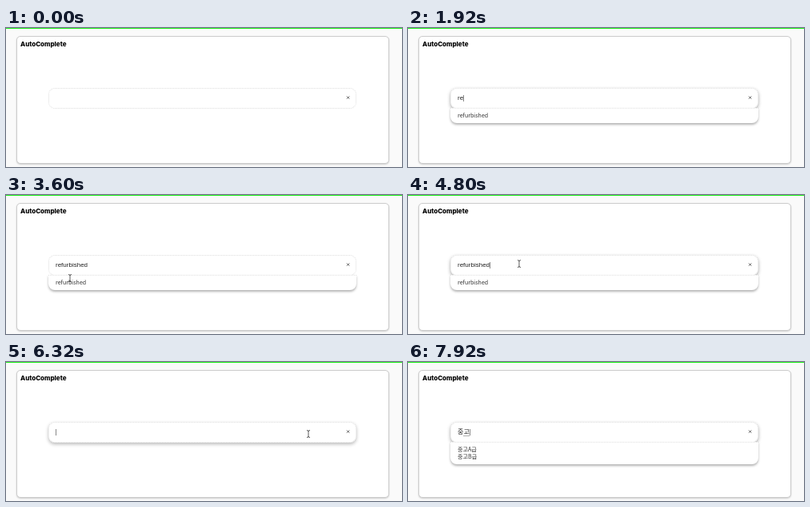
Write an HTML page that moves like this. It is 495 px wide and 174 px high and loops after 8000 ms.

```html
<!DOCTYPE html>
<html lang="en">
<head>
<meta charset="utf-8">
<title>AutoComplete</title>
<style>
html, body { margin: 0; width: 100%; height: 100%; overflow: hidden; }
body { position: relative; background: #fafafa; }
body * { position: absolute; box-sizing: border-box; white-space: pre; }
#bar { left: 0; top: 0; width: 495px; height: 1.4px; background: #1ef01a; }
#card { left: 13px; top: 10px; width: 466px; height: 160px; border: 1px solid #ccc; border-radius: 5px;
  background: #fff; box-shadow: 0 1px 2px rgba(0,0,0,.18); }
h1 { left: 18px; top: 14.5px; margin: 0; font: 800 8px/11px Inter, sans-serif; color: #000; }
#box, #list { left: 53px; width: 385px; background: #fff; }
#box { top: 75px; height: 26px; border: 1px dotted #ddd; border-radius: 8px; }
#list { top: 100px; border-top: 1px dotted #e2e2e2; border-radius: 0 0 8px 8px;
  box-shadow: 0 2px 3px rgba(0,0,0,.3); padding: 3.5px 0 0 9px; color: #333;
  font: 7.1px/9.4px "Noto Sans CJK KR", "Noto Sans CJK", sans-serif; }
#field { left: 62px; top: 82px; font: 8px/12px "Liberation Sans", "Noto Sans CJK KR", sans-serif; color: #222; }
#field u { position: static; text-decoration: none; box-shadow: 0 .8px #999; display: inline-block; line-height: 9px; }
#caret { top: 84px; width: .8px; height: 8px; background: #888; }
svg { left: 0; top: 0; fill: none; stroke: #333; }
</style>
</head>
<body>
<div id="bar"></div>
<div id="card"></div>
<h1>AutoComplete</h1>
<div id="box"></div>
<div id="list"></div>
<div id="field"></div>
<div id="caret"></div>
<svg width="495" height="174">
  <path d="M426 85.5l3.2 3.2m0-3.2l-3.2 3.2" stroke-width=".8"/>
  <path id="beam" d="M-2-4.5q2 0 2 1.5q0-1.5 2-1.5M0-3v6M-2 4.5q2 0 2-1.5q0 1.5 2 1.5" stroke-width=".8"/>
  <path id="arrow" d="M0-4v8.5l2-1.8 1.3 3 1.3-.6-1.3-2.8h2.6z" fill="#111" stroke="#fff" stroke-width=".6"/>
</svg>
<script>
const $ = id => document.getElementById(id);
const words = ['refurbished', '중고A급', '중고B급'];
const smooth = k => k * k * (3 - 2 * k);

// Successive field contents, a fixed interval apart
const type = (start, step, ...texts) => texts.map((text, i) => [start + i * step, text]);
const edits = [
  ...type(0, 0, ''),
  ...type(960, 180, 'ㄱ', 'ㄱㄷ', 'ㄱ', ''),
  ...type(1840, 80, 'r', 're'),
  ...type(3360, 0, 'refurbished'),
  ...type(5840, 0, ''),
  ...type(6880, 160, 'ㅈ', '주', '중', '중ㄱ', '중고')
];
const focusToggles = [400, 3360, 4600, 5840, 6180];
// Pointer stops: time, x, y
const stops = [
  [80, 420, 152], [240, 207, 88], [2000, 207, 88], [2640, 105, 126], [3360, 80, 104],
  [3600, 80, 104], [4320, 124, 86], [4640, 124, 86], [5840, 428, 87], [6180, 378, 90]
];

let shown;
function setText(text) {
  if (text === shown) return;
  shown = text;
  const composing = /[^a-z]$/.test(text);
  $('field').innerHTML = composing ? `${text.slice(0, -1)}<u>${text.slice(-1)}</u>` : text;
  const hits = words.filter(w => w.startsWith(text));
  $('list').hidden = !text;
  $('list').textContent = hits.join('\n');
  $('list').style.height = 9.4 * (1 + hits.length) + 'px';
}

// Typing hides the pointer until it moves again
function drawPointer(t, edited) {
  const i = stops.filter(s => s[0] <= t).length;
  const from = stops[i - 1], to = stops[i] || from;
  const visible = from && from[0] >= edited;
  $('beam').style.display = $('arrow').style.display = 'none';
  if (!visible) return;
  const k = to === from ? 0 : smooth((t - from[0]) / (to[0] - from[0]));
  const [x, y] = [1, 2].map(n => from[n] + (to[n] - from[n]) * k);
  const shape = $(x > 415 || y > 112 ? 'arrow' : 'beam');
  shape.style.display = '';
  shape.setAttribute('transform', `translate(${x} ${y})`);
}

function draw() {
  const t = performance.now() % 8000;
  const [edited, text] = edits.filter(e => e[0] <= t).pop();
  const toggles = focusToggles.filter(s => s <= t);
  const focused = toggles.length % 2;
  const toggled = toggles.pop() ?? -1000;
  setText(text);

  const fade = smooth(Math.min(1, (t - toggled) / 200));
  $('box').style.boxShadow = `0 2px 4px rgba(0,0,0,${.34 * (focused ? fade : 1 - fade)})`;

  const lit = (t - Math.max(edited, toggled)) % 1000 < 520;
  $('caret').hidden = !focused || !lit;
  $('caret').style.left = 61.8 + $('field').getBoundingClientRect().width + 'px';

  drawPointer(t, edited);
  requestAnimationFrame(draw);
}
draw();
</script>
</body>
</html>
```
